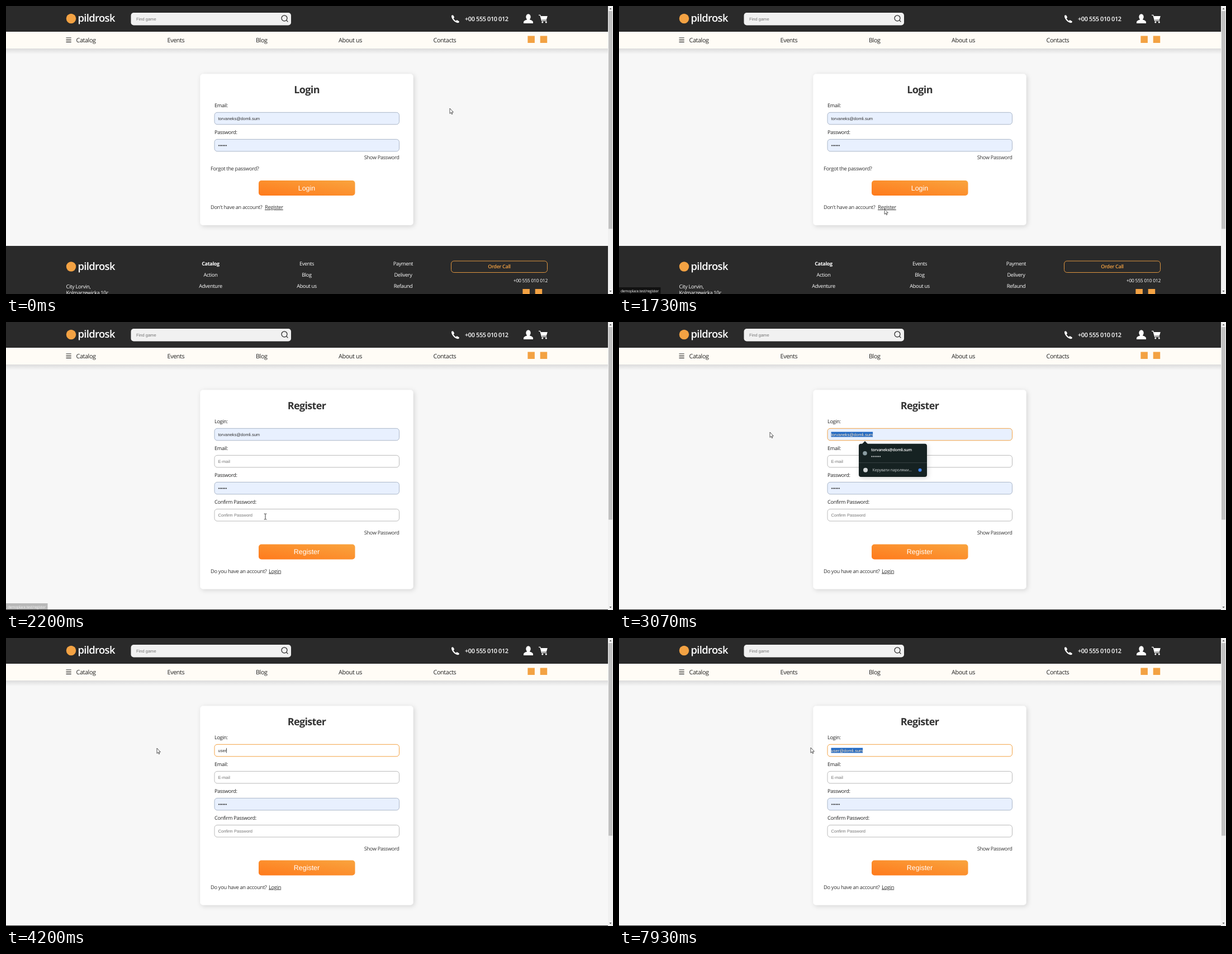
Animation, 1086 px wide and 515 px high, one loop 8000 ms. Source, as an HTML page:

```html
<!DOCTYPE html>
<html lang="en">
<head>
<meta charset="utf-8">
<title>Sign up</title>
<style>
html, body { margin: 0; width: 100%; height: 100%; overflow: hidden; background: #f7f7f7; }
svg { display: block; width: 100vw; height: 100vh; text-rendering: geometricPrecision; }
text { font-family: "Open Sans", "Noto Sans", sans-serif; letter-spacing: -.035em; fill: #333; white-space: pre; }
.ui { font-family: "Liberation Sans", Arial, sans-serif; letter-spacing: 0; }
.hint { fill: #757575; }
.link { text-decoration: underline; }
</style>
</head>
<body>
<svg id="stage" viewBox="0 0 1086 515" xmlns="http://www.w3.org/2000/svg"></svg>
<script>
const LOOP = 8000, STEP = 200 / 3;
const DARK = '#2a2a2a', ORANGE = '#f3a243', AUTO = '#e8f0fe';
const BRAND = 'pildrosk', PHONE = '+00 555 010 012';
const OLD_MAIL = 'torvaneks@domli.sum', NEW_MAIL = 'user@domli.sum';
const DOTS = '••••••';

const rect = (x, y, w, h, fill, more = '') =>
  `<rect x="${x}" y="${y}" width="${w}" height="${h}" fill="${fill}" ${more}/>`;
const dot = (x, y, r, fill) => `<circle cx="${x}" cy="${y}" r="${r}" fill="${fill}"/>`;
const text = (x, y, str, size, more = '') =>
  `<text x="${x}" y="${y}" font-size="${size}" ${more}>${str}</text>`;
const ui = (x, y, str, cls = '', more = '') => text(x, y, str, 7.54, `class="ui ${cls}" ${more}`);
const MID = 'text-anchor="middle"', END = 'text-anchor="end"';
const white = w => `style="fill:#fff" font-weight="${w}"`;

const field = (y, auto, id = '') =>
  rect(373, y, 330.5, 21.5, auto ? AUTO : '#fff',
    `rx="5" stroke="${auto ? '#98a6ba' : '#a9a9a9'}" stroke-width=".8" ${id}`);
const label = (y, str) => text(373, y, str, 9.15, 'style="fill:#222"');
const button = (y, str) => rect(452, y, 172.5, 27, 'url(#fire)', 'rx="5"') +
  text(538, y + 17.7, str, 12.45, `class="ui" ${MID} style="fill:#fff"`);
const card = (h, title) => rect(347.5, 121.5, 381, h, '#fff', 'rx="5" filter="url(#soft)"') +
  text(538, 156, title, 18, `${MID} font-weight="700"`);
const showPass = y => text(703.5, y, 'Show Password', 9.2, END);
const thumb = bottom => rect(1078, 9, 7, bottom - 9, '#c1c1c1');
const logo = y => dot(116.5, y, 8.7, ORANGE) + text(128.5, y + 5.5, BRAND, 18.4, white(600));
const social = (x, y) => rect(x, y, 12.5, 12.5, ORANGE) + rect(x + 22.3, y, 12.5, 12.5, ORANGE);

const defs = `<defs>
  <linearGradient id="fire" x1="0" y1="1" x2="1" y2="0">
    <stop stop-color="#ff7a1c"/><stop offset="1" stop-color="#f9a43e"/></linearGradient>
  <linearGradient id="fade" x1="0" y1="0" x2="0" y2="1">
    <stop stop-color="#000" stop-opacity=".11"/><stop offset="1" stop-color="#000" stop-opacity="0"/></linearGradient>
  <filter id="soft" x="-10%" y="-10%" width="120%" height="120%">
    <feDropShadow dx="2" dy="2" stdDeviation="4" flood-opacity=".15"/></filter>
  <clipPath id="selClip"><rect id="selCut" y="190" height="22"/></clipPath>
</defs>`;

const navItems = [[125.5, 'Catalog'], [288.5, 'Events'], [447, 'Blog'], [595, 'About us'], [764.5, 'Contacts']];
const header = rect(0, 0, 1077, 46, DARK) + logo(22.5) +
  rect(223.5, 12, 286.5, 22.5, '#f1f1f1', 'rx="5"') + ui(233, 25.8, 'Find game', 'hint') +
  `<g fill="none" stroke="#222" stroke-width="1.2"><circle cx="498" cy="21.8" r="5"/><path d="M501.6 25.4L504.4 28.3"/></g>
  <g fill="#fff">
    <path transform="translate(796.5 15.7)" d="M.5 1.5Q2 0 3.5 .8L5.5 4Q5.5 5.5 4 6.5Q6 9.5 8.5 11Q9.5 9.3 11 9.7L14 11.5Q15 13 13.5 14Q11 15.5 6 12Q0 6.5 .5 1.5Z"/>
    <ellipse cx="934.5" cy="19.5" rx="4.2" ry="5.2"/>
    <path d="M926 31V29Q926 26 932 24.5V22H937V24.5Q943 26 943 29V31Z"/>
    <path d="M956.5 18H968.8L966.8 24.7H958.5Z"/>
    <circle cx="959.8" cy="29" r="1.5"/><circle cx="966.3" cy="29" r="1.5"/>
  </g>
  <path d="M953 16.3H955.7L958.7 26.4H967.3" fill="none" stroke="#fff" stroke-width="1.3"/>` +
  text(821, 27, PHONE, 10.95, white(600)) +
  rect(0, 76, 1077, 10, 'url(#fade)') + rect(0, 46, 1077, 30, '#fffcf6') +
  '<path d="M107.5 57H116.7M107.5 60.6H116.7M107.5 64.3H116.7" stroke="#222" stroke-width="1.2"/>' +
  navItems.map(([x, s]) => text(x, 64.5, s, 10.8, 'style="fill:#222"')).join('') + social(933.4, 53.5);

const column = (x, items, bold) => items.map((s, i) =>
  text(x, 464.4 + i * 19.7, s, bold && !i ? 9 : 9.2, `${MID} ${white(bold && !i ? 700 : 500)}`)).join('');
const footer = rect(0, 429, 1077, 86, DARK) + logo(466) +
  text(107.5, 505.3, 'City Lorvin,', 9.3, white(500)) +
  text(107.5, 516, 'Kolmarzewicka 10c', 9.2, white(500)) +
  column(366, ['Catalog', 'Action', 'Adventure'], true) +
  column(538, ['Events', 'Blog', 'About us']) +
  column(710.5, ['Payment', 'Delivery', 'Refaund']) +
  rect(796.5, 456, 172, 20.5, 'none', `rx="5" stroke="${ORANGE}" stroke-width=".9"`) +
  text(882.5, 469.4, 'Order Call', 9, `${MID} font-weight="600" style="fill:${ORANGE}"`) +
  text(969, 494, PHONE, 8.6, `${END} ${white(500)}`) + social(924.4, 506);

const loginPage = footer + card(270.5, 'Login') +
  label(181.4, 'Email:') + field(190.3, true) + ui(379.5, 203.6, OLD_MAIL) +
  label(229.4, 'Password:') + field(238.4, true) + ui(379.5, 251.6, DOTS) +
  showPass(274) + text(366, 294, 'Forgot the password?', 9.3) + button(312, 'Login') +
  text(366, 363, "Don't have an account?", 9.2) + text(463, 363, 'Register', 9.4, 'class="link"') +
  thumb(398.5);

const registerPage = rect(0, 514, 1077, 1, DARK) + card(356, 'Register') +
  label(181.4, 'Login:') + field(190.3, true, 'id="box"') +
  '<rect id="sel" y="196.5" height="9" fill="#2169c3"/>' +
  ui(379.5, 203.6, '', '', 'id="typed"') +
  ui(379.5, 203.6, '', '', 'id="picked" style="fill:#fff" clip-path="url(#selClip)"') +
  rect(0, 196.8, .7, 8.6, '#000', 'id="caret"') +
  label(229.4, 'Email:') + field(238.4, false) + ui(379.5, 251.6, 'E-mail', 'hint') +
  label(277.4, 'Password:') + field(286.4, true) + ui(379.5, 299.6, DOTS) +
  label(325.4, 'Confirm Password:') + field(334.5, false) + ui(379.5, 347.7, 'Confirm Password', 'hint') +
  showPass(380) + button(397.5, 'Register') +
  text(366, 448.5, 'Do you have an account?', 9.3) + text(470, 448.5, 'Login', 9.4, 'class="link"') +
  thumb(353.5);

const popup = `<g id="popup"><g fill="#172021" filter="url(#soft)">
    <path d="M434.5 218.5L440 213L445.5 218.5Z"/><rect x="429" y="217.8" width="122" height="59.2" rx="4"/></g>
  <path d="M429 251.6H551" stroke="#465052" stroke-width=".7"/>` +
  dot(440, 234.7, 3.8, '#8b9da2') + text(451, 231.2, OLD_MAIL, 7.2, white(600)) +
  text(451, 243.4, DOTS, 7.6, 'class="ui" style="fill:#d5d9da;letter-spacing:.3px"') +
  dot(441, 264.7, 4, '#d3d7d8') +
  text(453.5, 267.4, 'Керувати паролями...', 7.2, 'style="fill:#c8cdce"') +
  dot(538.5, 264.7, 3, '#4285f4') + '</g>';

const status = '<g id="status">' + rect(0, 503, 74.5, 12, '#111') +
  text(3, 511.6, 'demoplace.test/register', 6.6, white(500)) + '</g>';

const bar = rect(1077, 0, 9, 515, '#f1f1f1') +
  '<path d="M1079.5 6L1081.5 3.6L1083.5 6ZM1079.5 509L1081.5 511.4L1083.5 509Z" fill="#555"/>';

const pointer = `<g id="pointer">
  <path id="arrow" d="M0 0V9.4L2.1 7.4L3.5 10.6L4.9 10L3.5 6.9H6.4Z" fill="#fff" stroke="#222" stroke-width=".75"/>
  <path id="beam" d="M-2.3 -5H-.6L0 -4.4L.6 -5H2.3M0 -4.4V4.4M-2.3 5H-.6L0 4.4L.6 5H2.3" fill="none" stroke="#222" stroke-width=".9"/></g>`;

document.getElementById('stage').innerHTML = defs + rect(0, 0, 1086, 515, '#f7f7f7') + bar +
  `<g id="login">${loginPage}</g><g id="register">${registerPage}</g>` + header + popup + status + pointer;

const el = {};
document.querySelectorAll('[id]').forEach(n => el[n.id] = n);

// time, x, y
const path = [
  [0, 794, 183], [130, 786, 177], [270, 660, 196], [400, 470, 240], [530, 330, 282], [600, 307, 294],
  [730, 380, 306], [870, 447, 314], [1000, 466, 345], [1130, 475, 363], [2000, 475, 363], [2200, 464, 348],
  [2400, 462, 280], [2600, 464, 208], [2670, 463, 200], [2800, 463, 199], [2870, 455, 198],
  [2930, 400, 197], [3000, 310, 197], [3070, 270, 197], [6730, 270, 197], [6800, 300, 225],
  [6870, 390, 268], [6930, 444, 281], [7000, 444, 281], [7200, 448, 248], [7400, 450, 210],
  [7600, 447, 197], [7730, 442, 196], [7800, 430, 196], [7870, 409, 196], [7930, 343, 196]
];
const keys = [3730, 3870, 4000, 4200, 4930, 5200, 5400, 5530, 5600, 5800, 6000, 6200, 6330, 6400];
const statusSteps = [[0, 0], [1330, .5], [1400, 1], [2130, .65], [2200, .27], [2270, 0]];
const FOCUS = 2670, POPUP = 2800, SWITCH = 1800, CLICK = 7670;

function pointerAt(t) {
  const i = path.findIndex(p => p[0] > t);
  if (i < 0) return path[path.length - 1].slice(1);
  const [a, b] = [path[i - 1], path[i]];
  const k = (t - a[0]) / (b[0] - a[0]);
  return [a[1] + (b[1] - a[1]) * k, a[2] + (b[2] - a[2]) * k];
}
const show = (node, on) => node.setAttribute('display', on ? 'inline' : 'none');
const set = (node, attrs) => { for (const k in attrs) node.setAttribute(k, attrs[k]); };

function draw(time) {
  const t = Math.round(Math.min(119, Math.floor((time + 5) / STEP)) * STEP / 10) * 10;
  const [x, y] = pointerAt(t);
  const second = t >= SWITCH;
  show(el.login, !second);
  show(el.register, second);

  const rows = second ? [190, 238, 286, 334] : [190, 238];
  const over = x > 373 && x < 704 && rows.some(r => y > r && y < r + 22);
  el.pointer.setAttribute('transform', `translate(${x} ${y})`);
  show(el.beam, over);
  show(el.arrow, !over);

  el.status.setAttribute('opacity', statusSteps.filter(s => s[0] <= t).pop()[1]);
  show(el.popup, t >= POPUP && t < keys[0]);

  const count = keys.filter(k => k <= t).length;
  const value = count ? NEW_MAIL.slice(0, count) : OLD_MAIL;
  el.typed.textContent = el.picked.textContent = value;
  const focused = t >= FOCUS;
  set(el.box, {
    fill: count ? '#fff' : AUTO,
    stroke: focused ? ORANGE : '#98a6ba',
    'stroke-width': focused ? 1 : .8
  });

  // selection grows leftwards from the end of the text, one letter at a time
  const dragging = (t >= 2870 && !count) || t > CLICK;
  let from = value.length;
  const reach = n => 379.5 + (n && second ? el.typed.getSubStringLength(0, n) : 0);
  const end = reach(from);
  if (dragging) while (from && (reach(from - 1) + reach(from)) / 2 > x) from--;
  const start = reach(from), width = end - start;
  set(el.sel, { x: start, width });
  set(el.selCut, { x: start, width });

  const since = t - Math.max(FOCUS, t >= CLICK ? CLICK : 0, ...keys.filter(k => k <= t));
  el.caret.setAttribute('x', end);
  show(el.caret, focused && width < .1 && Math.floor(since / 530) % 2 === 0);
}

let begin = null;
function tick(now) {
  if (begin === null) begin = now;
  draw((now - begin) % LOOP);
  requestAnimationFrame(tick);
}
draw(0);
requestAnimationFrame(tick);
</script>
</body>
</html>
```
